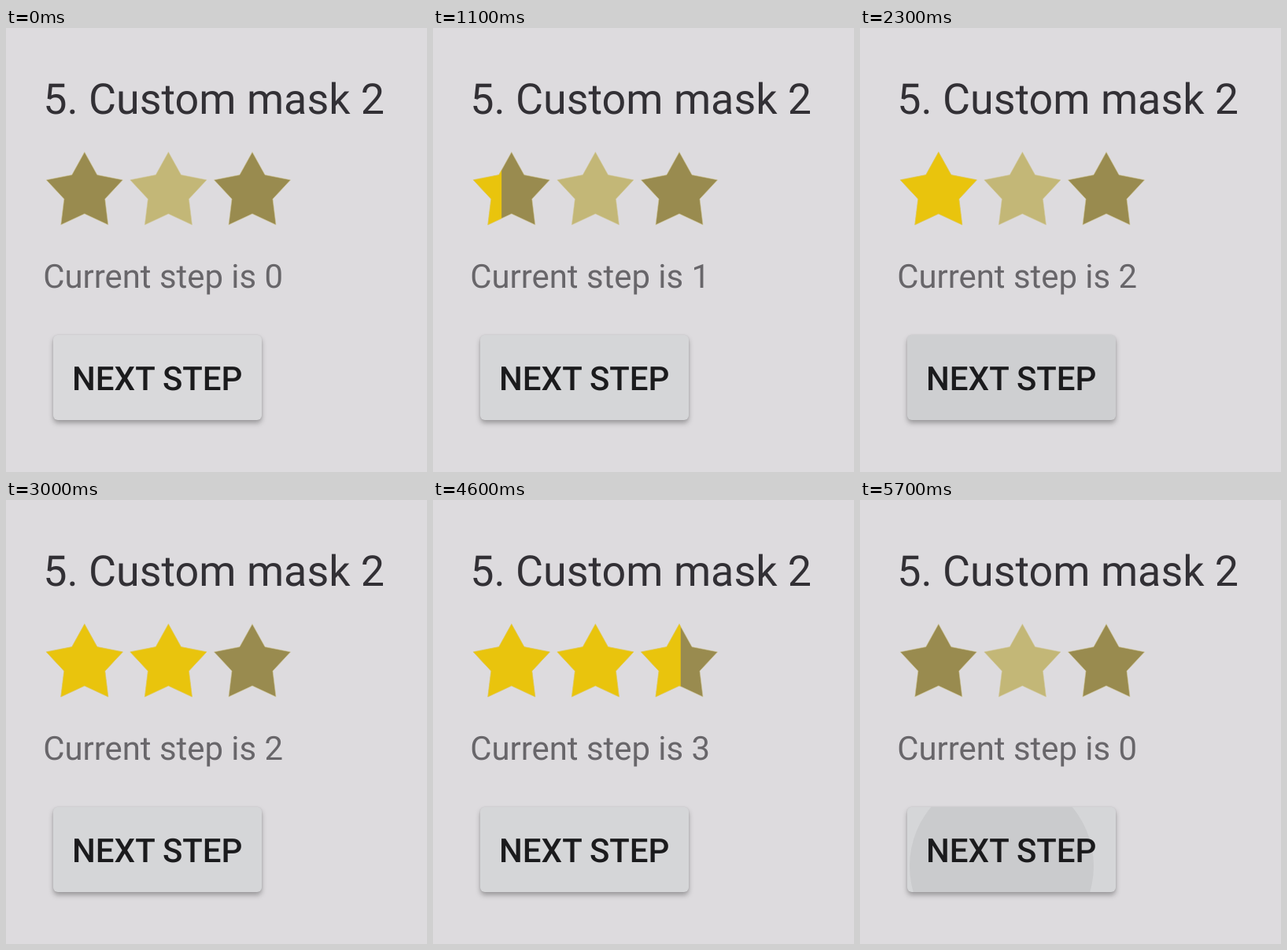
Write an HTML page that moves like this. It is 535x564 px and loops after 6.1 s.

```html
<!DOCTYPE html>
<html lang="en">
<head>
<meta charset="utf-8">
<title>Step mask</title>
<style>
  html, body { margin: 0; width: 100%; height: 100%; overflow: hidden; background: #dddbde; }
  svg { display: block; width: 535px; height: 564px; font-family: Roboto, sans-serif; text-rendering: geometricPrecision; }
</style>
</head>
<body>
<svg viewBox="0 0 535 564">
  <defs>
    <clipPath id="wipe"><rect id="wipeRect" x="49" y="150" width="0" height="110"/></clipPath>
    <clipPath id="buttonShape"><rect x="60" y="390" width="265" height="108" rx="6"/></clipPath>
  </defs>
  <rect width="535" height="564" fill="#dddbde"/>
  <text x="47.2" y="109.2" font-size="53.85" fill="#323035">5. Custom mask 2</text>
  <g id="emptyStars" stroke="#d2c99c" stroke-opacity=".6"></g>
  <g id="fullStars" clip-path="url(#wipe)" stroke="#e6cf62" stroke-opacity=".6"></g>
  <text id="label" x="47.2" y="330.4" font-size="41.88" fill="#68666a"></text>
  <rect id="button" x="60" y="390" width="265" height="108" rx="6"/>
  <g clip-path="url(#buttonShape)"><circle id="ripple" cx="180"/></g>
  <text x="84" y="460" font-size="42" font-weight="500" fill="#1b1b1d">NEXT STEP</text>
</svg>
<script>
const LOOP = 6100, TICK = 100, LAST_CHANGE = 5700;
const STEP_WIDTH = 104.4;
const clicks = [
  { at: 400, ripple: 500, step: 1 },
  { at: 2000, ripple: 2100, step: 2 },
  { at: 3800, ripple: 3900, step: 3 },
  { at: 5600, ripple: 5600, step: 0 }
];
const $ = id => document.getElementById(id);
const clamp = v => Math.max(0, Math.min(1, v));
const set = (el, attrs) => Object.entries(attrs).forEach(([k, v]) => el.setAttribute(k, v));

function starPoints(cx, cy, radius) {
  return Array.from({ length: 10 }, (_, i) => {
    const r = i % 2 ? radius * 0.535 : radius;
    const a = i * Math.PI / 5;
    return `${(cx + r * Math.sin(a)).toFixed(2)},${(cy - r * Math.cos(a)).toFixed(2)}`;
  }).join(' ');
}

function addStar(group, index, fill) {
  const star = document.createElementNS('http://www.w3.org/2000/svg', 'polygon');
  set(star, { points: starPoints(99.8 + index * 106.6, 208.7, 51.1), fill });
  $(group).append(star);
}

['#998b4f', '#c3b777', '#998b4f'].forEach((color, i) => {
  addStar('emptyStars', i, color);
  addStar('fullStars', i, '#e9c40d');
});

function render(time) {
  const t = Math.min(Math.floor(time / TICK) * TICK, LAST_CHANGE);
  const click = clicks.filter(c => c.at <= t).pop();
  const step = click ? click.step : 0;
  const progress = click ? clamp((t - click.at - 300) / 700) ** 1.8 : 0;
  const level = step ? step - 1 + progress : 0;
  const age = click ? t - click.ripple : -1;
  const lift = age < 0 ? 0 : clamp(1 - age / 100);

  $('label').textContent = `Current step is ${step}`;
  set($('wipeRect'), { width: level * STEP_WIDTH });
  set($('button'), { fill: t < 1100 ? '#d9d9db' : '#d5d6d8' });
  // The button rises while it is pressed.
  $('button').style.filter =
    `drop-shadow(0 ${4 + 4 * lift}px ${3 + lift}px rgba(0, 0, 0, .27)) drop-shadow(0 0 1px rgba(0, 0, 0, .1))`;
  set($('ripple'), {
    cy: 475 - 10 * clamp(age / 100),
    r: age < 0 ? 0 : 28 + age * 0.89,
    opacity: age < 0 ? 0 : 0.052 * clamp(1 - (age - 100) / 250)
  });
}

const start = performance.now();
function frame() {
  render((performance.now() - start) % LOOP);
  requestAnimationFrame(frame);
}
frame();
</script>
</body>
</html>
```
